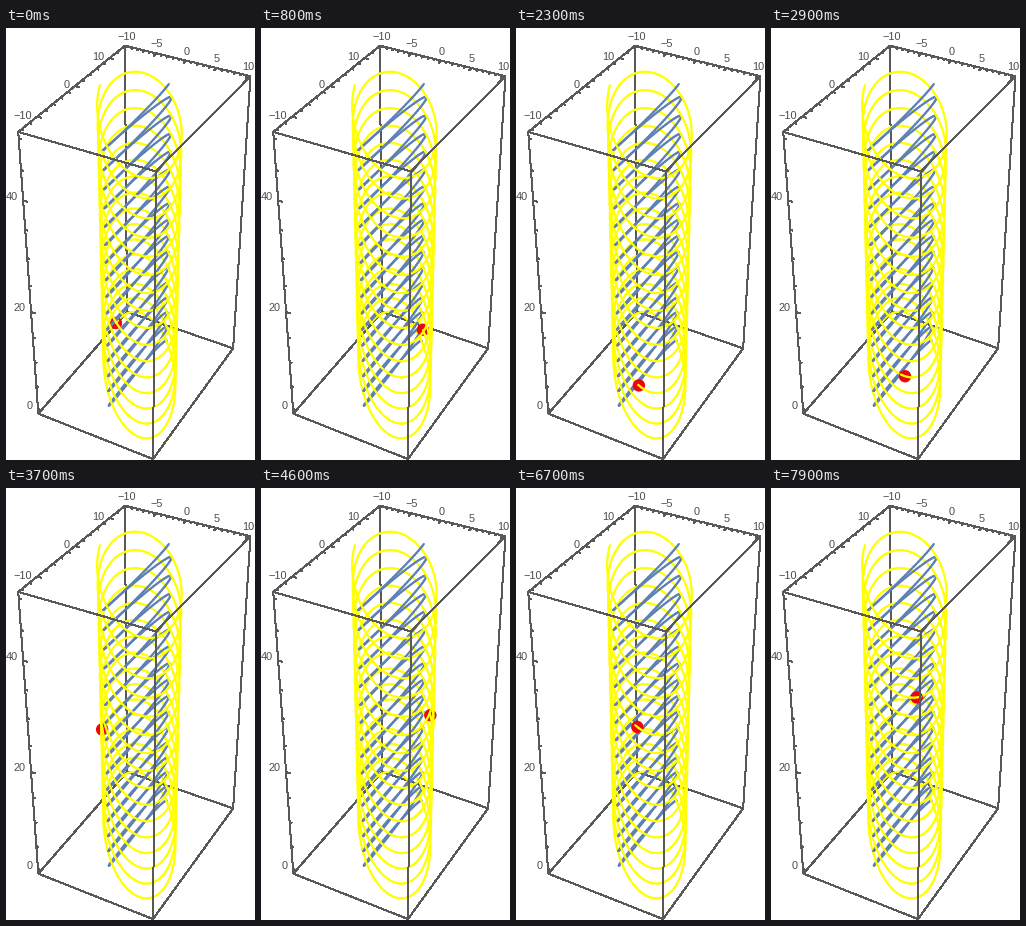
Write a matplotlib script that moves like this. It is 249 px wide and 432 px high and loops after 8000 ms.

```python
import numpy as np
import matplotlib.pyplot as plt
from matplotlib.animation import FuncAnimation
from matplotlib.collections import LineCollection
from matplotlib.patches import Circle

W, H, DPI = 249, 432, 64
PT = 72 / DPI  # points per pixel
FRAMES, STEP = 80, 0.5
YELLOW, BLUE, RED = (1, 1, 0), (0.368, 0.507, 0.71), (0.93, 0.02, 0.05)
GRAY = "0.35"

# Perspective camera aimed at the centre of the box
SCALE, FOCAL = 52, 1153
MID = np.array([0, 0, 25])
EYE = np.array([1.3, -2.4, 2.0])
DIST = np.linalg.norm(EYE)
FORWARD = -EYE / DIST
RIGHT = np.array([-EYE[1], EYE[0], 0]) / np.hypot(EYE[0], EYE[1])
UP = np.cross(RIGHT, FORWARD)
BX, BY, Z0, Z1 = 10.4, 14.7, -1, 51


def project(p):
    """Screen x, y (y down) and depth of world points."""
    q = (np.asarray(p, float) - MID) / SCALE
    depth = DIST + q @ FORWARD
    return 133 + FOCAL * (q @ RIGHT) / depth, 225.5 - FOCAL * (q @ UP) / depth, depth


def wave(t):
    """Flat elliptical swing climbing along z."""
    return np.stack([-0.5 * np.sin(2 * t), 10 * np.cos(2 * t), t], -1)


def helix(t):
    """The swing plus a circular motion of radius 10."""
    return wave(t) + 10 * np.stack([-np.cos(2 * t), np.sin(2 * t), 0 * t], -1)


def pieces(curve, n=1300):
    x, y, d = project(curve(np.linspace(0, 50, n)))
    xy = np.stack([x, y], -1)
    return np.stack([xy[:-1], xy[1:]], 1), (d[:-1] + d[1:]) / 2


fig = plt.figure(figsize=(W / DPI, H / DPI), dpi=DPI, facecolor="white")
ax = fig.add_axes([0, 0, 1, 1])
ax.set_xlim(0, W)
ax.set_ylim(H, 0)
ax.axis("off")


def line(a, b, z=1):
    x, y, _ = project([a, b])
    ax.plot(x, y, color=GRAY, lw=PT, zorder=z, solid_capstyle="butt",
            antialiased=False)


def label(value, p, dx, dy, ha):
    x, y, _ = project(p)
    ax.text(x + dx, y + dy, str(value).replace("-", "\u2212"), ha=ha,
            va="center_baseline", family="Liberation Sans", fontsize=11 * PT,
            color="0.3")


# Box: edges meeting at the near corner lie in front of the curves
ring = [(-BX, -BY), (-BX, BY), (BX, BY), (BX, -BY)]
for i, a in enumerate(ring):
    b = ring[(i + 1) % 4]
    for z in (Z0, Z1):
        line((*a, z), (*b, z), z=6 if ring[3] in (a, b) else 1)
    line((*a, Z0), (*a, Z1), z=6 if a == ring[3] else 1)


def ticks(first, last, minor, major, place, inward, dx, dy, ha):
    for v in range(first, last + 1, minor):
        p = np.array(place(v), float)
        big = v % major == 0
        line(p, p + np.array(inward) * (1 if big else 0.6))
        if big:
            label(v, p, dx, dy, ha)


ticks(-10, 10, 1, 5, lambda v: (v, BY, Z1), (0, -0.9, 0), 0, -10, "center")
ticks(-14, 14, 2, 10, lambda v: (-BX, v, Z1), (0.7, 0, 0), -5.5, -2, "right")
ticks(0, 50, 5, 20, lambda v: (-BX, -BY, v), (0.7, 0, 0), -5, -4.5, "right")

# Both curves as short pieces painted from far to near
seg_h, dep_h = pieces(helix)
seg_w, dep_w = pieces(wave)
segs = np.concatenate([seg_h, seg_w])
deps = np.concatenate([dep_h, dep_w])
cols = np.array([YELLOW] * len(seg_h) + [BLUE] * len(seg_w))
order = np.argsort(-deps)
segs, deps, cols = segs[order], deps[order], cols[order]
mids = segs.mean(1)
style = dict(linewidths=2.2 * PT, capstyle="round")

ax.add_collection(LineCollection(segs, colors=cols, zorder=3, **style),
                  autolim=False)
ball = Circle((0, 0), 6.2, facecolor=RED, edgecolor="none", zorder=4)
ax.add_patch(ball)
cover = LineCollection([], zorder=5, **style)
ax.add_collection(cover, autolim=False)


def update(i):
    x, y, depth = project(helix(np.float64(i * STEP)))
    ball.center = (x, y)
    # Redraw the nearby pieces that pass in front of the ball
    close = np.hypot(mids[:, 0] - x, mids[:, 1] - y) < 9
    near = close & (deps < depth + 0.005)
    cover.set_segments(segs[near])
    cover.set_color(cols[near])
    return ball, cover


anim = FuncAnimation(fig, update, frames=FRAMES, interval=100, repeat=True,
                     repeat_delay=0, blit=False)
plt.show()
```
